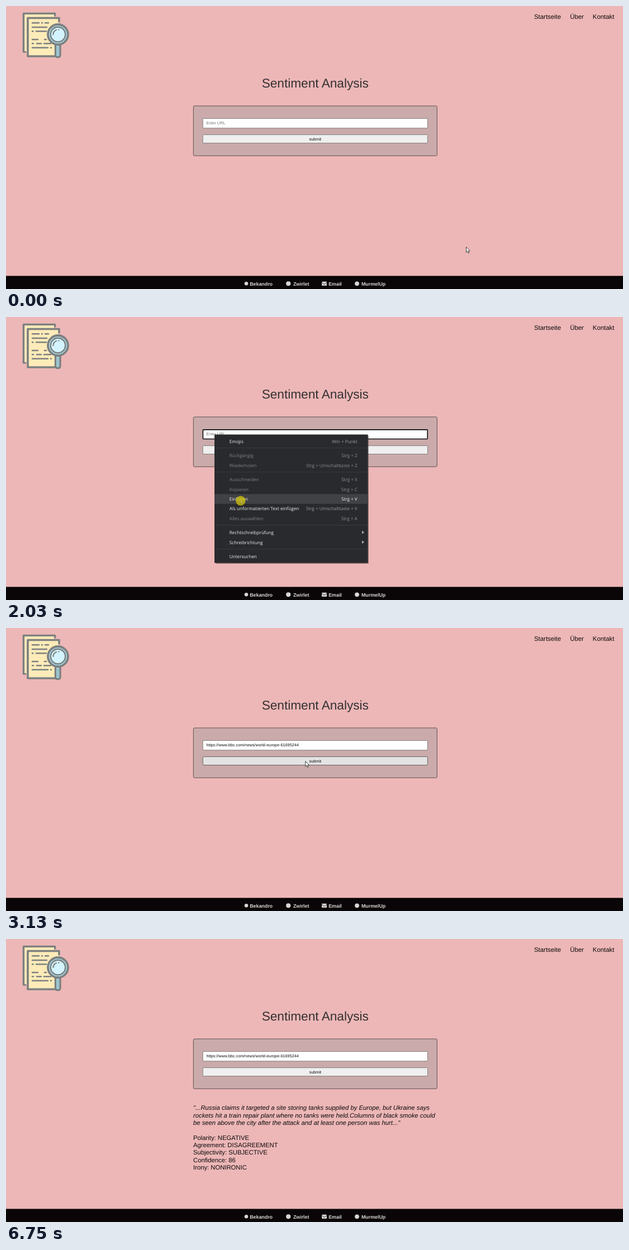
Write an HTML page with a canvas that moves like this. It is 1104 px wide and 507 px high and loops after 7.63 s.

```html
<!DOCTYPE html>
<html lang="en">
<head>
<meta charset="utf-8">
<title>Sentiment Analysis</title>
<style>
html, body { margin: 0; width: 100%; height: 100%; overflow: hidden; background: #edb7b7; }
canvas { display: block; }
</style>
</head>
<body>
<canvas id="stage" width="1104" height="507"></canvas>
<script>
const ctx = document.getElementById('stage').getContext('2d');
const LOOP = 7630;
const SANS = '"Liberation Sans", Arial, sans-serif';
const MENU_FONT = '8.15px "Open Sans", "Noto Sans", sans-serif';
const GREY = '#7d8080';

// Pointer positions, each segment evenly sampled: start time, step, points.
const pointer = [];
function travel(start, step, points) {
  points.forEach(([x, y], i) => pointer.push({ t: start + i * step, x, y }));
}
travel(0, 70, [[823.5, 431.8], [318.5, 259.3]]);
travel(220, 88, [[317, 240], [322, 206], [345, 186], [372, 206], [384, 234], [376, 223], [373.3, 211]]);
travel(1300, 74, [[376, 217], [383, 233], [392, 253], [402, 276], [410, 297], [416, 314], [419, 325], [420.4, 329.6]]);
travel(2260, 70, [[430, 320], [452, 295], [478, 268], [500, 245], [515, 248], [526, 250], [533, 243], [535.8, 238.7]]);
travel(5870, 100, [[722, 419], [915, 452], [981, 460]]);
travel(6220, 100, [[994, 457], [1042, 478], [1075.5, 492]]);
travel(6670, 80, [[1076.5, 497], [1120, 520]]);

const during = (t, a, b) => t >= a && t < b;
const inside = (p, x, y, w, h) => p.x >= x && p.x < x + w && p.y >= y && p.y < y + h;

function text(str, x, y, font, color, align = 'left') {
  ctx.font = font;
  ctx.fillStyle = color;
  ctx.textAlign = align;
  ctx.fillText(str, x, y);
}

function box(x, y, w, h, r, fill, stroke, line = 1) {
  ctx.beginPath();
  ctx.roundRect(x, y, w, h, r);
  ctx.fillStyle = fill;
  ctx.fill();
  if (!stroke) return;
  ctx.strokeStyle = stroke;
  ctx.lineWidth = line;
  ctx.stroke();
}

function disc(x, y, r, fill, stroke, line) {
  ctx.beginPath();
  ctx.arc(x, y, r, 0, Math.PI * 2);
  ctx.fillStyle = fill;
  ctx.fill();
  if (!stroke) return;
  ctx.strokeStyle = stroke;
  ctx.lineWidth = line;
  ctx.stroke();
}

function path(d, fill, stroke, line) {
  const p = new Path2D(d);
  if (fill) {
    ctx.fillStyle = fill;
    ctx.fill(p);
  }
  if (stroke) {
    ctx.strokeStyle = stroke;
    ctx.lineWidth = line;
    ctx.stroke(p);
  }
}

function drawDocument() {
  ctx.save();
  ctx.lineCap = ctx.lineJoin = 'round';
  path('M87.5 17V13.5H31.5V82H34.5', null, GREY, 3.6);
  path('M33.3 15.3H86V20H37V81H33.3Z', '#fdebb8');
  path('M95 31V21.5H39V90H89V72L95 60Z', '#fdebb8');
  path('M95 28V21.5H39V90H88', null, GREY, 3.6);
  path('M47 30.2H59M64 30.2H65M70 30.2H76M47 38H73M47 45.2H48.5M54 45.2H72' +
    'M47 60H57M69 60H72M47 67.3H49M55 67.3H63M68 67.3H80M47 74.7H75M80 74.7H81',
    null, GREY, 2.5);
  box(88.5, 69, 8.5, 22.5, [0, 0, 3.5, 3.5], '#a5d3df', GREY, 3.4);
  path('M93 73V87', null, '#8fbcc8', 2);
  disc(93, 51, 18, '#a6d6e3', GREY, 3.8);
  disc(93, 51, 13.2, '#d3f4fe', GREY, 2.4);
  path('M84.5 51A8.5 8.5 0 0 1 90 43M94 42.5H94.5', null, GREY, 2.2);
  ctx.restore();
}

function drawFooter() {
  const ink = '#d9d6d6';
  box(0, 483.5, 1104, 24, 0, '#0a0607');
  disc(430, 497.3, 3.2, ink);
  disc(505.2, 497.3, 4.1, ink);
  box(565, 493.8, 9, 7.2, 1, ink);
  path('M565 495.4L569.5 498.7L574 495.4', null, '#0a0607', 0.8);
  disc(628, 497.3, 3.9, ink);
  [['Bekandro', 436.2], ['Zwirlet', 513.9], ['Email', 577.2], ['MurmelUp', 636]]
    .forEach(([label, x]) => text(label, x, 500.5, 'bold 8.85px ' + SANS, ink));
}

function drawForm(t, p, menuOpen) {
  const focused = during(t, 910, 2970);
  const pasted = t >= 2180;
  const hover = !menuOpen && inside(p, 352, 230, 403, 16);
  const pressed = during(t, 2970, 3050);
  const small = '7.3px ' + SANS;

  box(335.3, 179, 436, 89.3, 2, '#caaaaa', '#5f5151', 1);
  if (focused) box(352.4, 201.9, 401.8, 16.6, 1, '#fff', '#0c0c0c', 1.6);
  else box(352.2, 201.6, 402.2, 17.2, 0.5, '#fff', '#7b7474', 0.9);
  if (pasted) text('https://www.bbc.com/news/world-europe-61695244', 358.4, 212.3, small, '#111');
  else text('Enter URL', 358.4, 212.3, small, '#777');
  if (during(t, 910, 1410)) box(358.3, 206, 0.9, 8.5, 0, '#000');
  if (during(t, 2180, 2680)) box(524.4, 206, 0.9, 8.5, 0, '#000');

  const face = pressed ? '#f5f5f5' : hover ? '#e3e3e3' : '#efefef';
  box(352.2, 230.6, 402.2, 15, 1, face, hover ? '#5c5757' : '#7b7474', 0.9);
  text('submit', 553.3, 240.9, small, '#111', 'center');
}

// Label, shortcut, row centre, enabled, has submenu.
const items = [
  ['Emojis', 'Win + Punkt', 222.6, 1],
  ['Rückgängig', 'Strg + Z', 248.1, 0],
  ['Wiederholen', 'Strg + Umschalttaste + Z', 265.6, 0],
  ['Ausschneiden', 'Strg + X', 291.2, 0],
  ['Kopieren', 'Strg + C', 308.6, 0],
  ['Einfügen', 'Strg + V', 326, 1],
  ['Als unformatierten Text einfügen', 'Strg + Umschalttaste + V', 343.5, 1],
  ['Alles auswählen', 'Strg + A', 361, 0],
  ['Rechtschreibprüfung', '', 386.4, 1, 1],
  ['Schreibrichtung', '', 403.8, 1, 1],
  ['Untersuchen', '', 429, 1]
];

function drawMenu(p) {
  box(376, 213, 273, 229, 0, 'rgba(60,40,40,.25)');
  box(375, 212, 273.3, 229.4, 0, 'rgba(60,50,50,.6)');
  box(373, 210.6, 274.4, 229.8, 0, '#292a2d');
  [234.6, 277.8, 373, 415.8].forEach(y => box(373, y - 0.4, 274.4, 0.9, 0, '#3d3e41'));
  for (const [label, keys, y, enabled, sub] of items) {
    const hot = enabled && inside(p, 373, y - 8.6, 274, 17.3);
    if (hot) box(373, y - 8.7, 274.4, 17.4, 0, '#404144');
    text(label, 399.8, y + 2.9, MENU_FONT, enabled ? '#f1f2f4' : '#808184');
    text(keys, 628.7, y + 2.9, MENU_FONT, hot ? '#f1f2f4' : enabled ? '#9a9da1' : '#8b8d90', 'right');
    if (sub) path(`M637 ${y - 3.6}L641 ${y - 0.6}L637 ${y + 2.4}Z`, '#a4a7ab');
  }
}

function drawResult() {
  const size = '11.28px ' + SANS;
  const line = 13.36;
  [
    '"...Russia claims it targeted a site storing tanks supplied by Europe, but Ukraine says',
    'rockets hit a train repair plant where no tanks were held.Columns of black smoke could',
    'be seen above the city after the attack and at least one person was hurt..."',
    '',
    'Polarity: NEGATIVE',
    'Agreement: DISAGREEMENT',
    'Subjectivity: SUBJECTIVE',
    'Confidence: 86',
    'Irony: NONIRONIC'
  ].forEach((row, i) => text(row, 335, 306.2 + i * line, (i < 3 ? 'italic ' : '') + size, '#0d0a0a'));
}

function drawPointer(t, p, menuOpen) {
  const click = during(t, 910, 990) || during(t, 2030, 2110) || during(t, 2970, 3050);
  ctx.save();
  ctx.translate(p.x, p.y);
  if (click) {
    disc(-0.6, -0.4, 8.6, 'rgba(205,192,10,.78)');
    ctx.scale(0.5, 0.5);
    ctx.globalAlpha = 0.5;
  }
  if (!menuOpen && inside(p, 352, 202, 403, 17)) {
    path('M-2 -5H2M0 -5V5M-2 5H2', null, '#111', 0.9);
  } else {
    path('M0 0V9.4L2.1 7.5L3.6 10.9L5.2 10.2L3.8 7H6.6Z', '#fff', '#151515', 0.8);
  }
  ctx.restore();
}

function draw(t) {
  const p = pointer.findLast(k => k.t <= t);
  const menuOpen = during(t, 990, 2110);

  box(0, 0, 1104, 507, 0, '#edb7b7');
  drawDocument();
  [['Startseite', 945], ['Über', 1009.2], ['Kontakt', 1049.8]]
    .forEach(([label, x]) => text(label, x, 22.6, '11.4px ' + SANS, '#0d0a0a'));
  text('Sentiment Analysis', 553.3, 146.4, '22.65px ' + SANS, '#353132', 'center');
  drawForm(t, p, menuOpen);
  if (t >= 4550) drawResult();
  drawFooter();
  if (menuOpen) drawMenu(p);
  drawPointer(t, p, menuOpen);
}

ctx.textRendering = 'geometricPrecision';
const begin = performance.now();
function tick() {
  draw((performance.now() - begin) % LOOP);
  requestAnimationFrame(tick);
}
tick();
</script>
</body>
</html>
```
